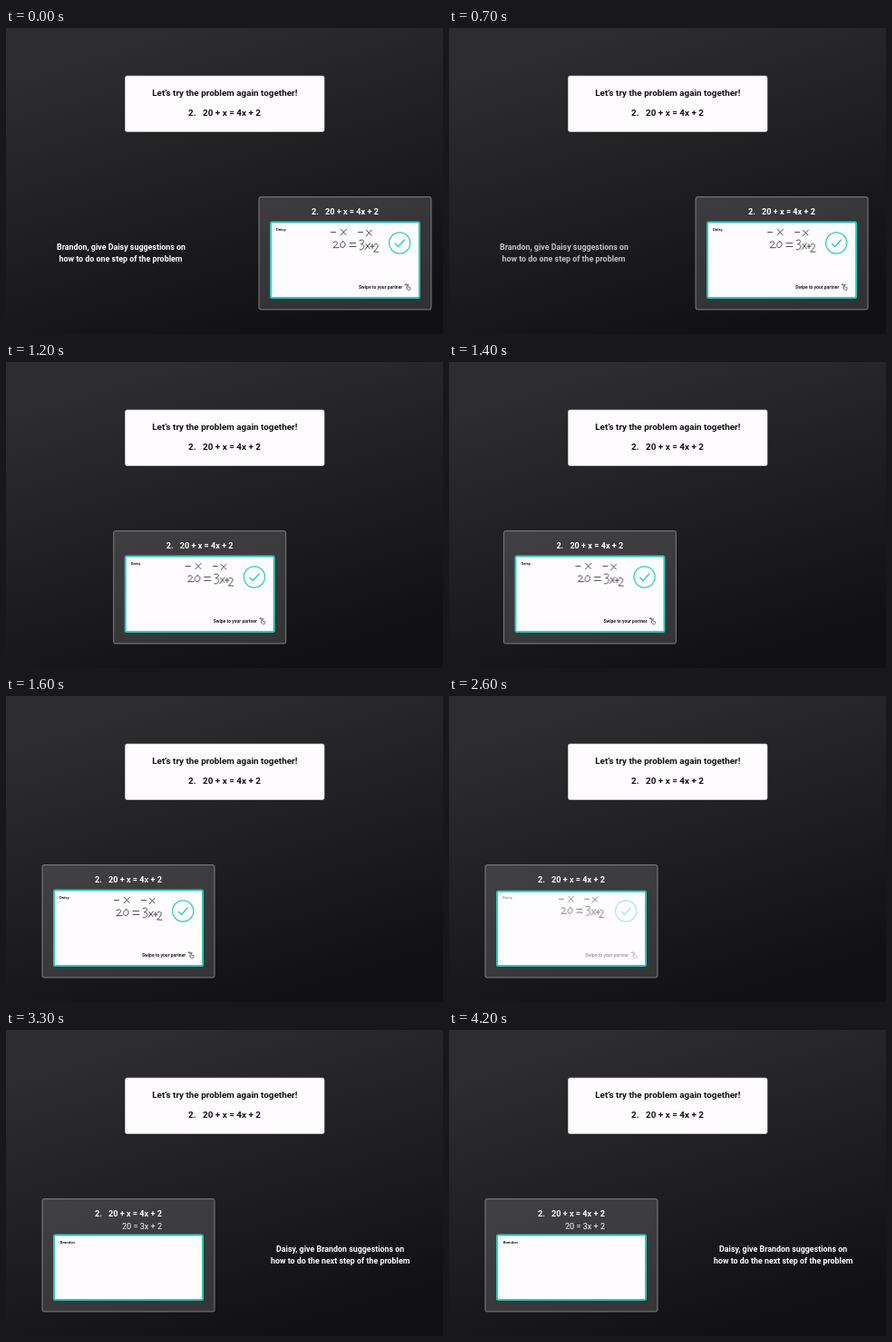
Write an HTML page that moves like this. It is 482x338 px and loops after 4.6 s.

```html
<!DOCTYPE html>
<html lang="en">
<head>
<meta charset="utf-8">
<title>Try the problem together</title>
<style>
  html, body { margin: 0; width: 100%; height: 100%; overflow: hidden; background: #1a191c; }
  svg { display: block; width: 482px; height: 338px; }
  text { font-family: Roboto, Arial, sans-serif; font-weight: 700; fill: #fff; white-space: pre; }
  .title { font-size: 9.9px; fill: #111; }
  .sum { font-size: 9.1px; }
  .prompt { font-size: 8.9px; text-anchor: middle; }
  .name { font-size: 4.3px; fill: #222; }
  .hint { font-size: 5px; fill: #222; }
  .result { font-size: 9.1px; font-weight: 400; }
  .ink { fill: none; stroke: #333; stroke-width: .9; stroke-linecap: round; stroke-linejoin: round; }
  .teal { fill: none; stroke: #2ccbb9; }

  /* The script scrubs every animation through --t, in milliseconds. */
  .card, .pad, .ask, .reply, .done, .work, .next, .result {
    animation: 4600ms linear calc(var(--t, 0) * -1ms) infinite paused;
  }
  .card, .pad, .work { animation-timing-function: cubic-bezier(.37, 0, .63, 1); }
  .work { transform-origin: 384.5px 235px; }
  .card { animation-name: slide; }
  .pad { animation-name: shrink; }
  .work { animation-name: lift, ink-out; animation-timing-function: cubic-bezier(.37, 0, .63, 1), linear; }
  .ask { animation-name: ask-out; }
  .done { animation-name: done-out; }
  .reply, .next { animation-name: reply-in; }
  .result { animation-name: result-in; }

  @keyframes slide {
    0%, 12.83% { transform: translateX(0); }
    34.57%, 100% { transform: translateX(-239px); }
  }
  @keyframes shrink {
    0%, 52.07% { y: 214.5px; height: 83.5px; }
    72.83%, 100% { y: 226.5px; height: 71.5px; }
  }
  @keyframes lift {
    0%, 52.07% { transform: none; }
    72.83%, 100% { transform: translate(4.5px, -18.5px) scale(.42); }
  }
  @keyframes ask-out { 0%, 12.83% { opacity: 1; } 21.74%, 100% { opacity: 0; } }
  @keyframes done-out { 0%, 52.07% { opacity: 1; } 59.67%, 100% { opacity: 0; } }
  @keyframes ink-out { 0%, 52.07% { opacity: 1; } 68%, 100% { opacity: 0; } }
  @keyframes reply-in { 0%, 64.67% { opacity: 0; } 71.74%, 100% { opacity: 1; } }
  @keyframes result-in {
    0%, 58% { opacity: 0; transform: translateY(8px); }
    71.74%, 100% { opacity: 1; transform: none; }
  }
</style>
</head>
<body>
<svg viewBox="0 0 482 338">
  <defs>
    <linearGradient id="night" gradientUnits="userSpaceOnUse" x1="190" y1="0" x2="292" y2="338">
      <stop offset="0" stop-color="#2d2c2f"/>
      <stop offset="1" stop-color="#111013"/>
    </linearGradient>
  </defs>
  <rect width="482" height="338" fill="url(#night)"/>

  <rect x="131.5" y="53" width="219.5" height="61.5" rx="2" fill="#fefcff" stroke="#d5dcda" stroke-width=".7"/>
  <text class="title" x="241.3" y="75.2" text-anchor="middle">Let’s try the problem again together!</text>
  <text class="title" x="201" y="97.2">2.</text>
  <text class="title" x="217" y="97.2">20 + x = 4x + 2</text>

  <g class="ask">
    <text class="prompt" x="127" y="245.4">Brandon, give Daisy suggestions on</text>
    <text class="prompt" x="126.5" y="257.9">how to do one step of the problem</text>
  </g>
  <g class="reply">
    <text class="prompt" x="368.7" y="245.4">Daisy, give Brandon suggestions on</text>
    <text class="prompt" x="368.7" y="257.9">how to do the next step of the problem</text>
  </g>

  <g class="card">
    <rect x="279" y="186.6" width="190" height="124.4" rx="2" fill="#fff" fill-opacity=".14" stroke="#8b8b8d" stroke-width=".9"/>
    <text class="sum" x="337" y="206.1">2.</text>
    <text class="sum" x="352" y="206.1">20 + x = 4x + 2</text>
    <rect class="pad" x="292" y="214.5" width="164" height="83.5" rx="1.5" fill="#fefcff" stroke="#2ccbb9" stroke-width="2"/>
    <text class="result" x="367" y="220.1">20 = 3x + 2</text>
    <text class="name next" x="298.8" y="236.4">Brandon</text>

    <g class="done">
      <text class="name" x="298" y="223.6">Daisy</text>
      <circle class="teal" cx="434.2" cy="237.5" r="11.6" stroke-width="1.2"/>
      <path class="teal" d="M429 238l3.6 3.5 7-7.8" stroke-width="1.3"/>
      <text class="hint" x="389" y="288.1">Swipe to your partner</text>
      <path class="ink" style="stroke-width: .6" d="M440.3 283.4h4m-4 0l1-1m-1 1l1 1M442.3 284.4v3l-.8-.6 1.6 2.6h2.6l.6-2.6-2.8-.6v-1.8"/>
    </g>

    <g class="work ink">
      <path d="M358.5 225.6h5M388.5 225.6h5"/>
      <path d="M369.5 222.5l5.5 6M375.5 222.3l-6.5 6.6M397.5 223.5l5.5 5.5M403.2 223.2l-6 6.6"/>
      <path d="M361 236.8c2-1.6 5-1 4.4 1.2-.5 1.8-3 3.4-4.6 4.8 2-.5 4 .2 6.4-.2"/>
      <path d="M371.6 235.8c-3.2.6-4.2 6.4-1 6.8 4 .2 5-6.6 1-6.8"/>
      <path d="M379 237.6h6.6M379 241.4h7"/>
      <path d="M390 234.8c2-1.4 5.2-.8 4.4 1.4-.5 1.5-2 2.3-3 2.6 3.2-.2 4 2 3.2 3.8-.8 2-2.8 2.8-4.4 2.2"/>
      <path d="M396.6 238.2l4.6 5.6M401.4 237.8l-5.4 6.8"/>
      <path d="M401.8 241.2h4.4M404 238.8v4.8"/>
      <path d="M406 239.4c1.6-1.8 4.6-1 4.2 1.4-.3 2.4-2.8 4.4-4.6 6.4 2-.6 3.4.4 5.2.2"/>
    </g>
  </g>
</svg>
<script>
  const LOOP = 4600, STEP = 100, SLACK = 8;
  const start = performance.now();

  // The picture advances ten times a second.
  function tick() {
    const t = (performance.now() - start + SLACK) % LOOP;
    document.documentElement.style.setProperty('--t', Math.floor(t / STEP) * STEP);
    requestAnimationFrame(tick);
  }
  tick();
</script>
</body>
</html>
```
